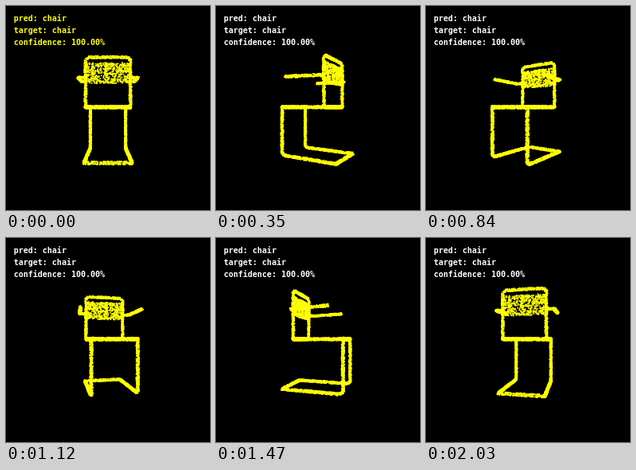
An HTML page with a canvas for the animation above (2.1 s loop, 256 by 256 pixels).

```html
<!DOCTYPE html>
<html lang="en">
<head>
<meta charset="utf-8">
<title>Rotating chair point cloud</title>
<style>
  html, body { margin: 0; width: 100%; height: 100%; overflow: hidden; background: #000; }
  canvas, svg { position: absolute; left: 0; top: 0; width: 256px; height: 256px; }
  text { font: bold 10px "DejaVu Sans Mono", "Liberation Mono", monospace; white-space: pre; }
</style>
</head>
<body>
<canvas id="stage" width="256" height="256"></canvas>
<svg id="labels" viewBox="0 0 256 256">
  <text x="9.7" y="19">pred: chair</text>
  <text x="9.7" y="34">target: chair</text>
  <text x="9.7" y="49">confidence: 100.00%</text>
</svg>
<script>
const STEP_MS = 70, STEPS = 30;
const CAMERA = 236, CENTER_X = 128, CENTER_Y = 127.2;
const DOT = 1.7;
const YELLOW = '#ff0', WHITE = '#fff';
const ctx = document.getElementById('stage').getContext('2d');
const labels = document.getElementById('labels');
const points = [];

let seed = 7;
function random() {
  seed = (seed * 1664525 + 1013904223) % 4294967296;
  return seed / 4294967296;
}
const spread = r => (random() * 2 - 1) * r;

// Scatters points over the surface of a tube between two positions.
function tube(a, b, radius = 1.5, density = 5) {
  const count = Math.round(Math.hypot(...a.map((v, i) => b[i] - v)) * density);
  for (let n = 0; n < count; n++) {
    const t = random(), turn = random() * 2 * Math.PI, z = spread(1);
    const flat = Math.sqrt(1 - z * z);
    const offset = [flat * Math.cos(turn), flat * Math.sin(turn), z];
    points.push(a.map((v, i) => v + (b[i] - v) * t + offset[i] * radius));
  }
}

function path(nodes, radius, density) {
  for (let i = 1; i < nodes.length; i++) tube(nodes[i - 1], nodes[i], radius, density);
}

// Axes: x across the chair, y up, z from the front edge to the back.
const SIDE = 25.5, FRONT = -36.3, BACK = 22, FLOOR = -58.9, FLOOR_BACK = 36.5;

for (const s of [-1, 1]) {
  const x = s * SIDE;
  // seat rail, front leg and floor runner
  path([[x, .3, BACK], [x, .3, FRONT], [x, FLOOR + 3, FRONT],
        [x, FLOOR, FRONT + 3], [x, FLOOR, FLOOR_BACK]], 1.6, 5.5);
  // half of the back frame
  path([[x, 0, BACK], [x, 54, BACK], [x - s * 3, 57.1, BACK], [0, 57.1, BACK]], 1.5, 4.5);
  // armrest
  path([[x, 34, BACK], [s * 34, 34, 21], [s * 35.5, 35.3, -23]], 1.6, 5);
}
tube([-SIDE, FLOOR, FLOOR_BACK], [SIDE, FLOOR, FLOOR_BACK], 1.7, 4.5);
tube([-SIDE, .3, BACK], [SIDE, .3, BACK], 1.9, 6);
tube([-SIDE, .3, FRONT], [SIDE, .3, FRONT], 1.9, 6);

for (let n = 0; n < 620; n++) {
  points.push([spread(SIDE), 39 + spread(11.7), BACK + spread(1)]);
}

function draw(step) {
  const angle = step / STEPS * 2 * Math.PI;
  const c = Math.cos(angle), s = Math.sin(angle);
  ctx.fillStyle = '#000';
  ctx.fillRect(0, 0, 256, 256);
  ctx.fillStyle = YELLOW;
  for (const [x, y, z] of points) {
    const scale = CAMERA / (CAMERA + x * s - z * c);
    const px = CENTER_X + (x * c + z * s) * scale;
    const py = CENTER_Y - y * scale;
    ctx.fillRect(px - DOT / 2, py - DOT / 2, DOT, DOT);
  }
  labels.setAttribute('fill', step === 0 ? YELLOW : WHITE);
}

function tick() {
  draw(Math.floor(performance.now() / STEP_MS) % STEPS);
  requestAnimationFrame(tick);
}
tick();
</script>
</body>
</html>
```
